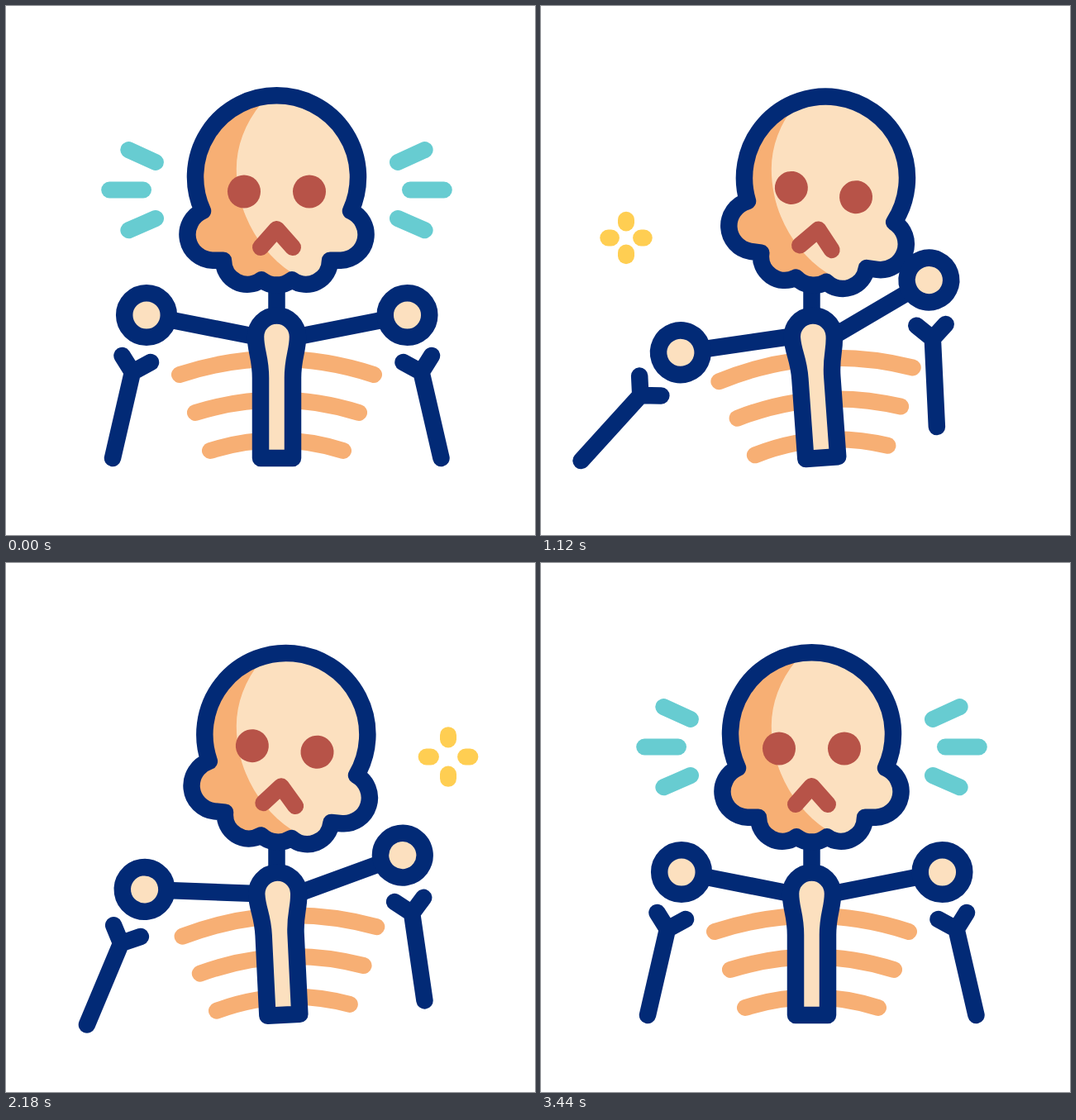
Write an HTML page that moves like this. It is 640 px wide and 640 px high and loops after 3.5 s.

```html
<!DOCTYPE html>
<html lang="en">
<head>
<meta charset="utf-8">
<title>Dancing skeleton</title>
<style>
  html, body { margin: 0; width: 100%; height: 100%; overflow: hidden; background: #fff; }
  svg { display: block; width: 100vw; height: 100vh; }
  .line { fill: none; stroke-width: 20; stroke-linecap: round; stroke-linejoin: round; }
  .navy { stroke: #022a76; stroke-width: 20.5; }
  .bone { fill: #fce0bf; }
  .rib { stroke: #f7af74; }
  .ray { stroke: #67ccd1; }
  .spark { stroke: #ffce52; }
  .dark { fill: #b75348; }
  .mouth { stroke: #b75348; }
</style>
</head>
<body>
<svg viewBox="0 0 640 640">
  <defs>
    <path id="skullShape" d="M238 248A98.500 98.500 0 1 1 417 248A31.200 31.200 0 0 1 405 307.700H392A29 29 0 0 1 346 331.200A30 30 0 0 1 309 331.200A29 29 0 0 1 263 307.700H250A31.200 31.200 0 0 1 238 248Z"/>
    <clipPath id="skullClip"><use id="clipShape" href="#skullShape"/></clipPath>
  </defs>
  <g id="rays"></g>
  <g id="sparks"></g>
  <g id="ribs" class="line rib">
    <path d="M210 446Q327.5 407.6 445 446"/>
    <path d="M229 492Q328 461 427 492"/>
    <path d="M247 538Q327.5 512.6 408 538"/>
  </g>
  <path class="line navy" d="M327.5 342V380"/>
  <use class="bone" id="skullFill" href="#skullShape"/>
  <path clip-path="url(#skullClip)" fill="#f7af74" d="M318.800 106L308.800 118C288.800 142 278.800 170 278.800 197C278.800 248 304.800 296 346 323L362 345H180V90Z"/>
  <g id="face">
    <use class="line navy" href="#skullShape"/>
    <ellipse id="eyeL" class="dark" cx="288" cy="224.5" rx="20" ry="20"/>
    <ellipse id="eyeR" class="dark" cx="367" cy="224.5" rx="20" ry="20"/>
    <path class="line mouth" d="M308 292L327.5 270L347 292"/>
  </g>
  <g id="armL" class="line navy">
    <path d="M302 400L170 374"/>
    <circle class="bone" cx="170" cy="374" r="26.8"/>
    <path id="foreL" d="M140.500 423L153 443L175 431M153 443L129 547"/>
  </g>
  <g id="armR" class="line navy">
    <path d="M353 400L485.500 374"/>
    <circle class="bone" cx="485.500" cy="374" r="26.8"/>
    <path id="foreR" d="M515 423L502.500 443L480.500 431M502.500 443L526.500 547"/>
  </g>
  <path id="sternum" class="line navy" style="fill:#fce0bf" d="M308 547V450C308 425 302 418 302 400A25.500 25.500 0 0 1 353 400C353 418 347 425 347 450V547Z"/>
</svg>
<script>
const LOOP = 3500;
const $ = id => document.getElementById(id);

// time, head, chest, arms, left forearm, right forearm (degrees)
const POSES = [
  [120, 0, 0, 0, 0, 0],
  [625, -8.1, 4, 19.6, -29.7, -49.5],
  [1110, 8.2, -4.1, -19.4, 48.7, 29.7],
  [1600, -5.2, 2.6, 13.7, -14.3, -28.6],
  [2110, 5.8, -2.9, -9.7, 20, 14.7],
  [2610, -1.1, -0.5, 5.1, -7, -6.2],
  [3110, 0, 0, 0, 0, 0]
];

// start time and centre of each burst
const SPARKS = [[980, 103, 280.5], [1595, 158, 86], [1962, 535, 234.5]];

// inner end and full reach of the left-hand rays
const RAYS = [[181, 189, -48, -22], [166, 222.5, -60, 0], [181, 257, -48, 21]];

const clamp = x => Math.min(1, Math.max(0, x));
const ease = (t, start, end) => (1 - Math.cos(Math.PI * clamp((t - start) / (end - start)))) / 2;

function poseAt(t) {
  let i = 0;
  while (i < POSES.length - 2 && t > POSES[i + 1][0]) i++;
  const a = POSES[i], b = POSES[i + 1], k = ease(t, a[0], b[0]);
  return a.slice(1).map((v, j) => v + (b[j + 1] - v) * k);
}

function addLine(parent, cls) {
  const el = document.createElementNS('http://www.w3.org/2000/svg', 'path');
  el.setAttribute('class', 'line ' + cls);
  return parent.appendChild(el);
}

const rays = [1, -1].flatMap(side => RAYS.map(([x, y, dx, dy]) => ({
  el: addLine($('rays'), 'ray'),
  x: side > 0 ? x : 655 - x, y, dx: dx * side, dy
})));

const petals = SPARKS.flatMap(([start, x, y]) =>
  [[0, -1], [1, 0], [0, 1], [-1, 0]].map(([dx, dy]) => ({
    el: addLine($('sparks'), 'spark'), start, x, y, dx, dy
  })));

// Draw the part of a ray between distances a and b
function drawSegment({ el, x, y, dx, dy }, a, b) {
  const shown = b - a > 0.005;
  el.setAttribute('visibility', shown ? 'visible' : 'hidden');
  if (shown) el.setAttribute('d', `M${x + dx * a} ${y + dy * a}L${x + dx * b} ${y + dy * b}`);
}

const turn = (id, deg, x, y) => $(id).setAttribute('transform', `rotate(${deg} ${x} ${y})`);
const blink = (t, mid) => clamp(Math.abs(t - mid) / 100);

function draw(t) {
  const [head, chest, arm, foreL, foreR] = poseAt(t);
  for (const id of ['skullFill', 'clipShape', 'face']) turn(id, head, 327.5, 326);
  for (const id of ['sternum', 'ribs']) turn(id, chest, 327.5, 375);
  turn('armL', arm, 302, 400);
  turn('armR', arm, 353, 400);
  turn('foreL', foreL, 170, 374);
  turn('foreR', foreR, 485.5, 374);

  const both = blink(t, 2840);
  $('eyeL').setAttribute('ry', 20 * Math.min(both, blink(t, 505)));
  $('eyeR').setAttribute('ry', 20 * both);

  const late = t > LOOP / 2;
  const outer = late ? 0.68 * ease(t, 3130, 3430) : 0.68 + 0.32 * ease(t, 20, 300);
  const inner = late ? 0 : ease(t, 20, 380);
  for (const ray of rays) drawSegment(ray, inner, outer);

  for (const p of petals) {
    const reach = lag => 17.5 + 15.5 * ease(t, p.start + lag, p.start + lag + 400);
    drawSegment(p, reach(90), reach(0));
  }
}

let begin;
function tick(now) {
  begin ??= now;
  draw((now - begin) % LOOP);
  requestAnimationFrame(tick);
}
draw(0);
requestAnimationFrame(tick);
</script>
</body>
</html>
```
